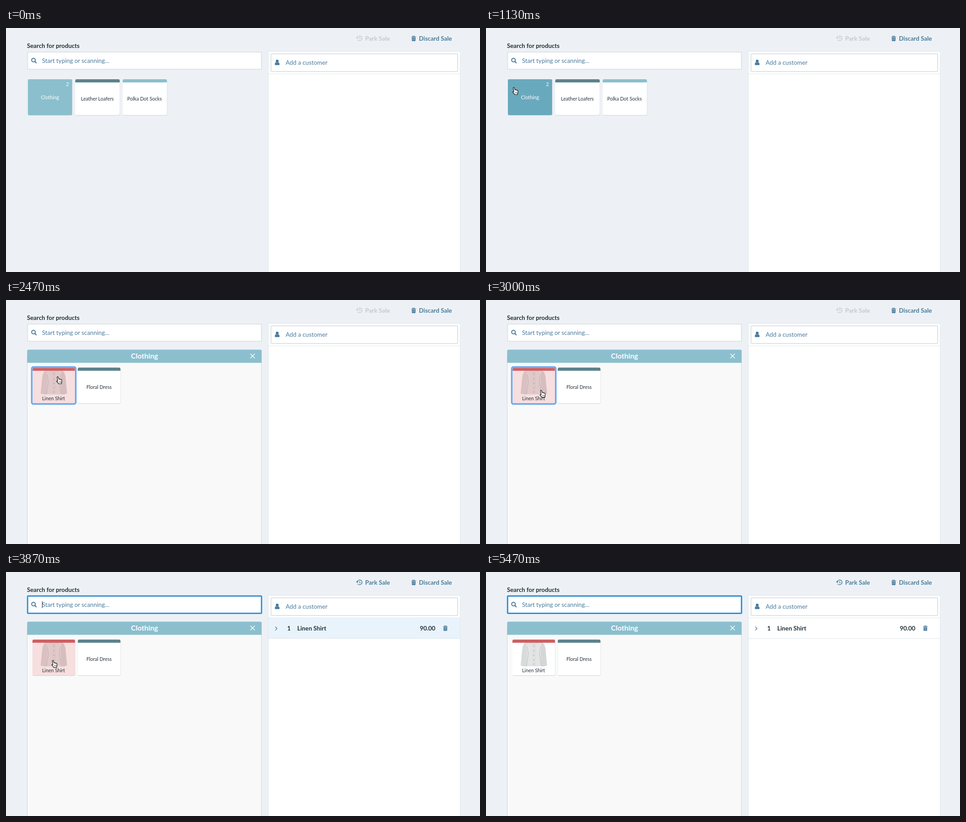
Write an HTML page that moves like this. It is 1040x538 px and loops after 5.54 s.

```html
<!DOCTYPE html>
<html lang="en">
<head>
<meta charset="utf-8">
<title>Adding a product to a sale</title>
<style>
html, body { margin: 0; width: 100%; height: 100%; overflow: hidden; background: #edf1f5; }
svg { display: block; }
text { font: 13.3px Lato, sans-serif; fill: #24323c; }
.b { font-weight: 700; }
.s { font-size: 10.7px; }
.m { text-anchor: middle; }
.link { fill: #4a7b9b; }
.white { fill: #fff; }
</style>
</head>
<body>
<svg id="stage" width="1040" height="538" viewBox="0 0 1040 538"></svg>
<script>
const LOOP = 5540, OPEN = 2230, ADD = 3640, PRICED = 3860;
const BLUE = '#4a7b9b', TEAL = '#8bbfce', DARK = '#5b838c', RED = '#cd6063';

const text = (x, y, s, cls = '', extra = '') => `<text x="${x}" y="${y}" class="${cls}" ${extra}>${s}</text>`;
const rect = (x, y, w, h, fill, extra = '') =>
  `<rect x="${x}" y="${y}" width="${w}" height="${h}" fill="${fill}" ${extra}/>`;
const path = (d, extra) => `<path d="${d}" ${extra}/>`;
const line = (d, color, width = 1.5) => path(d, `fill="none" stroke="${color}" stroke-width="${width}"`);
const group = (id, body) => `<g id="${id}">${body}</g>`;

const tile = (x, y, w, color, body = '') =>
  rect(x, y + 1, w + .5, 79, '#ccd4d9', 'rx="3"') + rect(x, y, w, 79, '#fff', 'rx="3"') + body +
  path(`M${x} ${y + 7}v-4q0-3 3-3h${w - 6}q3 0 3 3v4z`, `fill="${color}"`);

const ring = (id, x, y, w, h) => group(id,
  rect(x, y, w, h, 'none', 'rx="4" stroke="#a9cdf6" stroke-width="4"') +
  rect(x, y, w, h, 'none', 'rx="3" stroke="#62a3ef" stroke-width="2.4"'));

const trash = (x, y) => `<g transform="translate(${x} ${y})">` +
  path('M-5-4.3h10v1.3h-10zM-4-2.3h8v6.6q0 1.3-1.3 1.3h-5.4q-1.3 0-1.3-1.3z', `fill="${BLUE}"`) +
  line('M-2-4.3v-1.2h4v1.2', BLUE, 1.2) + line('M-1.9-1v5M0-1v5M1.9-1v5', '#b5cad8', .7) + '</g>';

const shirt =
  path('M86 156q-6 4-7 18l-3 32q6 3 13 2l4-27V156z', 'fill="#d9dada"') +
  path('M124 156q6 4 7 18l3 32q-6 3-13 2l-4-27V156z', 'fill="#d5d6d6"') +
  path('M88 156h34l-2 24 1 28H89l1-28z', 'fill="#e3e4e4"') +
  line('M90 164l3 16-4 27M120 164l-3 16 4 27', '#c1c3c3', 1) +
  line('M96 156q9 6 18 0', '#cccece', 1) +
  line('M103 158v50M107.5 158v50', '#d3d5d5', .8) +
  [164, 174, 184, 194, 203].map(y => `<circle cx="105" cy="${y}" r="1.1" fill="#a7aaaa"/>`).join('');

const hand = path('M-1.5 1q1.3-1.8 2.6 0l1.4 4.5q1.4-1 2.2.4q1.5-.8 2.2.5q1.7-.4 2 1q.4 4-.6 6v2.3h-6.4' +
  'q-1.6-2.5-4.3-5q-.5-2 1.7-1.4l.8.6z', 'fill="#fff" stroke="#111" stroke-width="1.2" stroke-linejoin="round"') +
  line('M3.2 10.3v3M5.1 10.3v3M6.9 10.3v3', '#222', .7);
const arrow = path('M0 0v12.2l2.8-2.6 2.1 4.6 2.2-.9-2-4.5h3.8z', 'fill="#111" stroke="#fff" stroke-width="1"');

stage.innerHTML =
  text(46, 43.8, 'Search for products', 'b') +
  rect(47.5, 53, 513, 38, '#fff', 'rx="1" stroke="#dbe3e9" stroke-width="2"') +
  group('focus', rect(47, 52.5, 514, 39, 'none', 'rx="2" stroke="#b5d8f2" stroke-width="4"') +
    rect(47.5, 53, 513, 38, 'none', 'rx="1.5" stroke="#0878cb" stroke-width="2"')) +
  `<circle cx="60.3" cy="70.8" r="4" fill="none" stroke="${BLUE}" stroke-width="2"/>` +
  line('M63.3 73.8l3.6 3.6', BLUE, 2.3) +
  text(79, 76.8, 'Start typing or scanning…', 'link') +
  group('caret', rect(79, 64.5, 1, 15, '#222')) +

  group('home',
    rect(48, 113, 97.5, 80, '#c6d5dc', 'rx="3"') + rect(48, 113, 97, 79, TEAL, 'rx="3" id="folder"') +
    text(96.5, 157, 'Clothing', 's m white') + text(138, 128.3, '2', 's white', 'text-anchor="end"') +
    tile(152, 113, 97.5, DARK) + text(200.5, 160.3, 'Leather Loafers', 's m') +
    tile(256, 113, 97, TEAL) + text(304, 160.3, 'Polka Dot Socks', 's m') +
    ring('homeRing', 47.5, 111.2, 99, 82.6)) +

  group('drawer',
    rect(46.5, 120, 514, 430, '#f9f9f9', 'stroke="#cdd6db"') +
    path('M46.5 138.5v-26q0-3 3-3h508.500q3 0 3 3v26z', `fill="${TEAL}"`) +
    text(304, 129.4, 'Clothing', 'b m white', 'style="font-size:15.8px"') +
    line('M536 118.500l10 10M546 118.500l-10 10', '#fff') +
    tile(58, 149, 93.5, RED, shirt +
      rect(58, 149, 93.5, 79, '#d65a62', 'rx="3" id="tint" opacity=".2"')) +
    text(104.3, 221.3, 'Linen Shirt', 's m') +
    tile(157.5, 149, 93.5, DARK) + text(204.2, 196.2, 'Floral Dress', 's m') +
    ring('drawerRing', 56.5, 147.7, 96.500, 81.500)) +

  group('park',
    line('M770.8 21.200a5.300 5.300 0 1 1 .7 4.600', 'currentColor', 1.4) +
    path('M768.800 19.500l.6 4.400 3.900-2z', 'fill="currentColor"') +
    line('M775.8 20v3.600h2.600', 'currentColor', 1.2) +
    text(788, 28, 'Park Sale', 'b', 'style="fill:currentColor"')) +
  trash(894.5, 23.3) + text(906, 28, 'Discard Sale', 'b link') +

  rect(575.5, 51.5, 421, 500, '#fff', 'stroke="#e0e6ea"') +
  rect(581.500, 57, 409.500, 39, '#fff', 'rx="1" stroke="#dbe3e9" stroke-width="2"') +
  `<circle cx="595" cy="73" r="3.200" fill="${BLUE}"/>` +
  path('M589.800 80.500q0-4.500 3-4.800q2.200 1.300 4.400 0q3 .3 3 4.800q0 1.300-1.500 1.300h-7.400q-1.500 0-1.500-1.300z', `fill="${BLUE}"`) +
  text(613.5, 81.3, 'Add a customer', 'link') +
  line('M576 101h420', '#e0e6ea', 1) +

  group('row',
    rect(576, 101, 420.500, 46, '#ddecf9', 'id="glow"') + line('M576 146.5h420', '#e0e6ea', 1) +
    line('M590.800 120.500l3.800 4-3.800 4', BLUE, 1.3) +
    text(617, 128.8, '1', 'b') + text(639, 128.8, 'Linen Shirt', 'b') +
    `<circle id="spinner" cx="935" cy="124" r="6" fill="none" stroke="${DARK}" stroke-width="2.200" pathLength="4" stroke-dasharray="2.700 1.300"/>` +
    text(942, 128.8, '90.00', 'b', 'id="price" text-anchor="end"') +
    trash(964, 124.2)) +
  group('cursor', group('hand', hand) + group('arrow', arrow));

const el = id => document.getElementById(id);
const show = (id, on) => el(id).style.display = on ? '' : 'none';
const ramp = (t, a, b) => Math.min(1, Math.max(0, (t - a) / (b - a)));

// time, x, y of the pointer tip
const route = [[0, -20, 118], [850, -20, 118], [1130, 61, 131], [1470, 104, 153], [2150, 104, 153],
  [2470, 113.5, 169], [2930, 121, 199], [3780, 121, 199], [4130, 51.5, 183.5], [4400, -20, 170], [LOOP, -20, 170]];

function pointer(t) {
  const i = route.findIndex(p => p[0] > t), [t0, x0, y0] = route[i - 1], [t1, x1, y1] = route[i];
  const k = ramp(t, t0, t1);
  return [x0 + (x1 - x0) * k, y0 + (y1 - y0) * k];
}

function draw(t) {
  const [x, y] = pointer(t), open = t >= OPEN, added = t >= ADD, priced = t >= PRICED;
  const hover = x >= (open ? 57 : 48);
  show('home', !open);
  show('drawer', open);
  show('homeRing', t >= 1700);
  show('drawerRing', !added);
  show('tint', hover);
  show('row', added);
  show('spinner', !priced);
  show('price', priced);
  show('caret', added && Math.floor((t - ADD) / 500) % 2 === 0);
  show('hand', hover);
  show('arrow', !hover);
  el('folder').setAttribute('fill', hover ? '#69a9be' : TEAL);
  el('park').style.color = added ? BLUE : '#c4cacf';
  el('focus').style.opacity = ramp(t, 3680, 3880);
  el('glow').style.opacity = 1 - ramp(t, 3690, 4190);
  el('spinner').setAttribute('transform', `rotate(${(t - 3670) * .36 - 90} 935 124)`);
  el('cursor').setAttribute('transform', `translate(${x} ${y})`);
}

const start = performance.now();
function tick() {
  draw((performance.now() - start) % LOOP);
  requestAnimationFrame(tick);
}
tick();
</script>
</body>
</html>
```
